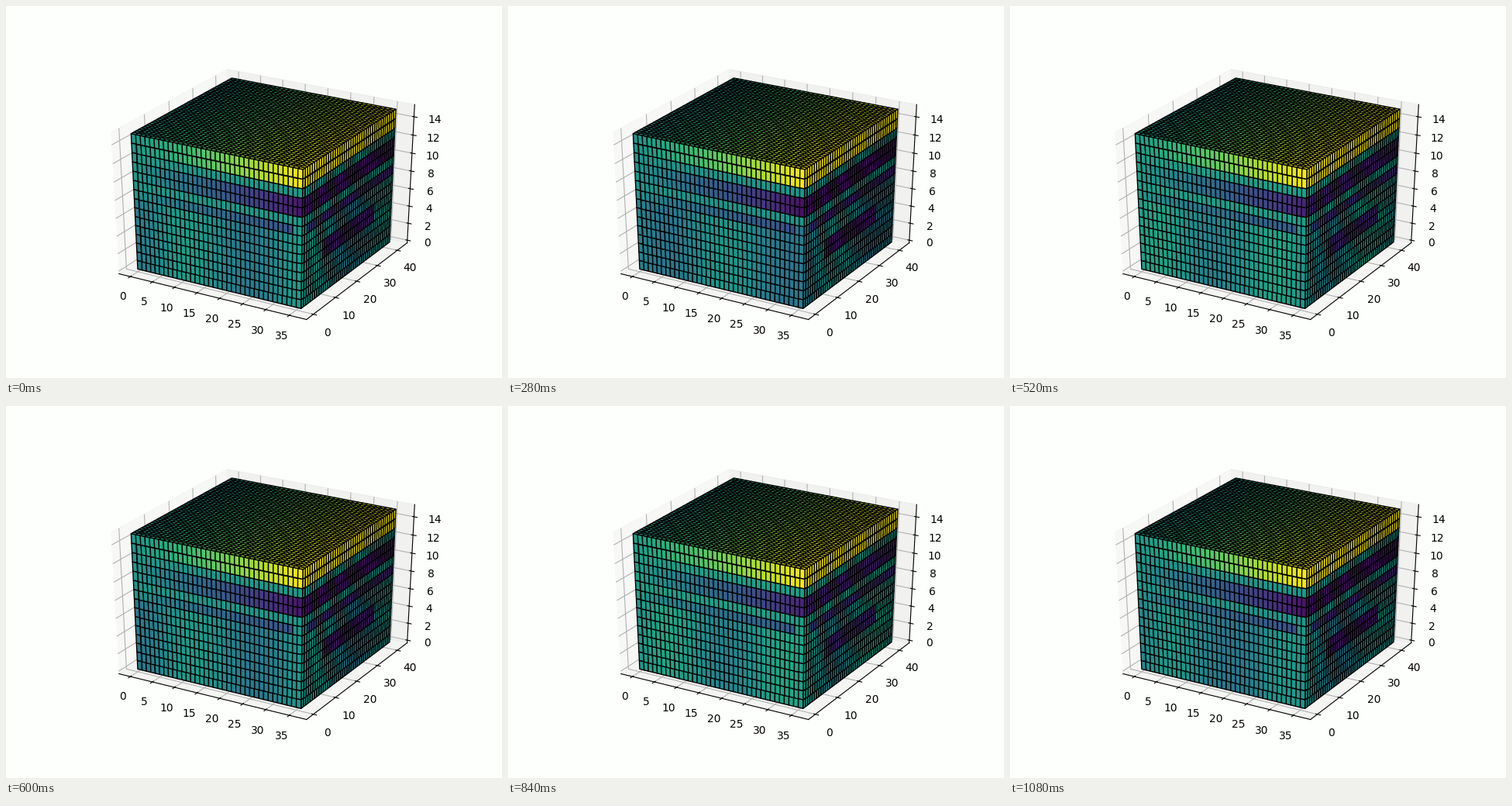
These frames come from a looping animation (640 px wide and 480 px high, 1120 ms). A matplotlib script:

```python
import numpy as np
import matplotlib.pyplot as plt
from matplotlib.animation import FuncAnimation
from matplotlib.transforms import Affine2D
from mpl_toolkits.mplot3d.art3d import Poly3DCollection

SIZE = NX, NY, NZ = 36, 42, 15
FRAMES, INTERVAL = 28, 40
BG = "#fdfffc"
WAVE = 26  # wavelength of the lower layers, in cells


def values(x, y, z, frame):
    """Colour map value of every cell at one moment."""
    t = frame / FRAMES
    swing = np.sin(2 * np.pi * (3 * t - 19 / 28 * 3))
    base = .54 + .02 * swing
    low = .08 + .03 * swing
    ramp = x / (NX - 1)

    # Five wavelengths per loop, pushed ahead in the middle of it
    crest = 11 + 5 * WAVE * t + 10 * np.sin(np.pi * t) ** 6
    wave = np.cos(2 * np.pi * (x - crest + .7 * y) / WAVE)
    noise = .49 + .03 * swing + .07 * wave

    fade = np.minimum(y / 8, 1)
    seam = base - (.28 + .12 * fade) * ramp ** .65
    notch = (x >= NX - 2) & (y < 2)
    body = (z >= 4) & (z < 6) & (y >= 9) & (y < 33)
    return np.select(
        [z >= 13, (z == 10) | (z == 11), z >= 9, (z == 8) & ~notch, body],
        [base + (.985 - base) * ramp, base - (base - low) * ramp,
         base, seam, low + .02],
        noise)


def face(axis, cell, level):
    """Unit quads and cell indices of one side of the block."""
    a, b = [i for i in range(3) if i != axis]
    i, j = (g.ravel() for g in np.mgrid[:SIZE[a], :SIZE[b]])
    cells = np.empty((i.size, 3), int)
    cells[:, axis], cells[:, a], cells[:, b] = cell, i, j
    quads = np.repeat(cells[:, None, :], 4, axis=1).astype(float)
    quads[:, :, axis] = level
    quads[:, 1:3, a] += 1
    quads[:, 2:4, b] += 1
    return quads, cells


fig = plt.figure(figsize=(6.4, 4.8), dpi=100, facecolor=BG)
ax = fig.add_subplot(projection="3d", facecolor=BG, computed_zorder=False)
ax.view_init(30, -60)
# Cubic box stretched over the whole axes area
ax.set_box_aspect((1, 1, 1), zoom=np.sqrt(3) / 1.8294640721620434)
ax.apply_aspect = lambda position=None: None

side = .05 + 1.1 / 48
ax.set_xlim(-side * NX, (1 + side) * NX)
ax.set_ylim(-side * NY, (1 + side) * NY)
ax.set_zlim(-NZ / 48, NZ * 49 / 48)
ax.set_xticks(range(0, 36, 5))
ax.set_yticks(range(0, 41, 10))
ax.set_zticks(range(0, 15, 2))

sides = [face(1, 0, 0), face(0, NX - 1, NX), face(2, NZ - 1, NZ)]
quads, cells = (np.concatenate(part) for part in zip(*sides))

# Cells on the near edges lie over the inner ones, those on the far edges under
x, y, z = cells.T
near = (x == NX - 1).astype(int) + (y == 0) + (z == NZ - 1) > 1
far = ~near & ((x == 0) | (y == NY - 1) | (z == 0))
inner = ~near & ~far

blocks = []
for order, mask in enumerate([far, inner, near], 1):
    block = Poly3DCollection(quads[mask], edgecolors="k", linewidths=1,
                             zorder=order)
    ax.add_collection3d(block)
    blocks.append((block, cells[mask].T))
# Inner cells are centred on pixels
blocks[1][0].set_transform(ax.transData + Affine2D().translate(.5, -.5))


def update(frame):
    for block, xyz in blocks:
        block.set_facecolor(plt.cm.viridis(values(*xyz, frame)))
    return [block for block, _ in blocks]


anim = FuncAnimation(fig, update, frames=FRAMES, interval=INTERVAL,
                     init_func=lambda: update(0), repeat=True, repeat_delay=0)
plt.show()
```
